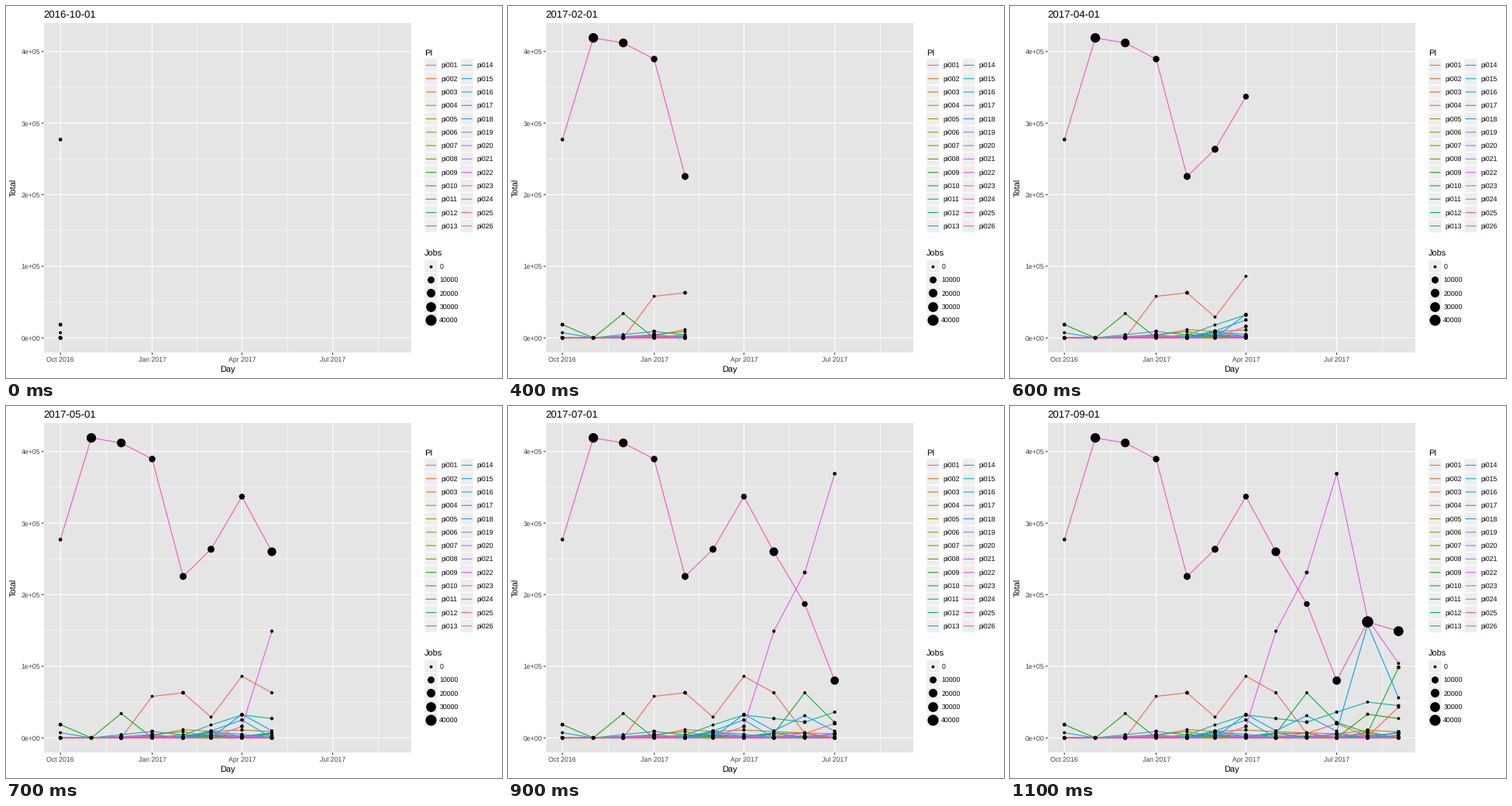
These frames come from a looping animation (640 by 480 pixels, 1.2 s). A matplotlib script:

```python
import matplotlib.pyplot as plt
import numpy as np
from matplotlib.animation import FuncAnimation
from matplotlib.patches import Rectangle

PX = 0.72  # points per pixel at 100 dpi
LINE = 1.07 * PX
PANEL = (48.7, 21.7, 522.9, 447.3)
KEY = 17.28
MAX_JOBS = 43

plt.rcParams["font.family"] = "Liberation Sans"
plt.rcParams["text.hinting"] = "none"

days = np.arange("2016-10", "2017-10", dtype="datetime64[M]").astype("datetime64[D]")
offsets = (days - days[0]).astype(int)
MONTHS, GROUPS = len(days), 26
month = np.arange(MONTHS)


def x_pos(day):
    return 70.2 + 1.287 * day


def y_pos(thousands):
    return 428.2 - 0.9237 * thousands


def hcl(hue, chroma=100, lum=65):
    """Polar LUV colour as RGB, slightly darkened by a display gamma."""
    h = np.radians(hue)
    y = ((lum + 16) / 116) ** 3
    u = chroma * np.cos(h) / (13 * lum) + 0.1978
    v = chroma * np.sin(h) / (13 * lum) + 0.4683
    x = 9 * y * u / (4 * v)
    z = -x / 3 - 5 * y + 3 * y / v
    rgb = np.array([
        3.240479 * x - 1.537150 * y - 0.498535 * z,
        -0.969256 * x + 1.875992 * y + 0.041556 * z,
        0.055648 * x - 0.204043 * y + 1.057311 * z,
    ]).clip(0, 1)
    srgb = np.where(rgb > 0.00304, 1.055 * rgb ** (1 / 2.4) - 0.055, 12.92 * rgb)
    return tuple(srgb.clip(0, 1) ** 1.25)


def area(jobs):
    size = 1 + 5 * np.sqrt(np.asarray(jobs) / MAX_JOBS)
    diameter = 0.75 * (size * 2.845 + 0.945) + 1
    return (diameter * PX) ** 2


def bursts(decay, peaks):
    """Jump to each peak, then fall by a constant factor per month."""
    level, out = 0, []
    for m in month:
        level = peaks.get(m, level * decay)
        out.append(level)
    return np.array(out)


# Totals and jobs in thousands: low seeded noise under a few busy groups
rng = np.random.default_rng(5)
totals = 9 * rng.random((GROUPS, MONTHS)) ** 5 * np.clip((month - 1) / 3, 0, 1)
totals[-2:] = 0
jobs = 0.6 * rng.random((GROUPS, MONTHS)) ** 4

busy = {
    1: bursts(0.1, {3: 58, 4: 63, 5: 29, 6: 86, 7: 63, 9: 20, 11: 43}),
    3: bursts(0.8, {4: 11.4, 6: 11, 10: 10.5}),
    9: bursts(0, {0: 18.5, 2: 34, 10: 33, 11: 27}),
    10: bursts(0.34, {8: 63, 11: 98.5}),
    13: 4.5 * (month - 1).clip(0) + 9.5 * np.cos(np.pi / 2 * (month - 6)) * (month > 3),
    16: bursts(0, {0: 7.2, 5: 9.7, 6: 25, 11: 8}),
    17: bursts(0.3, {6: 33, 8: 31, 10: 158, 11: 56}),
    22: bursts(0.45, {6: 16, 7: 149, 8: 231, 9: 369, 11: 104}),
}
for group, values in busy.items():
    totals[group - 1] = np.maximum(totals[group - 1], values)

LEADER = 23
totals[LEADER] = [277, 419, 412, 389.5, 225.5, 263.5, 337, 260, 187, 80, 162, 149]
jobs[LEADER] = [0.3, 27, 21, 8, 10, 10, 5, 21, 5, 18, MAX_JOBS, 30]

xs, ys = x_pos(offsets), y_pos(totals)
colors = [hcl(15 + 360 * i / GROUPS) for i in range(GROUPS)]

fig = plt.figure(figsize=(6.4, 4.8), dpi=100, facecolor="white")
ax = fig.add_axes([0, 0, 1, 1])
ax.set(xlim=(0, 640), ylim=(480, 0))
ax.axis("off")


def rect(x0, y0, x1, y1, color, **kw):
    ax.add_patch(Rectangle((x0, y0), x1 - x0, y1 - y0, fc=color, **kw))


def segment(x0, y0, x1, y1, color, width=LINE):
    ax.plot([x0, x1], [y0, y1], color=color, lw=width, snap=False,
            solid_capstyle="butt")


def label(x, y, text, size=8.8, color="black", **kw):
    return ax.text(x, y, text, fontsize=size * PX, color=color, **kw)


def legend_key(x, y):
    rect(x, y, x + KEY, y + KEY, "#eeeeee", ec="white", lw=LINE, snap=False)


# Panel, grid and axes
left, top, right, bottom = PANEL
rect(*PANEL, "#e5e5e5", lw=0)
for total in range(50, 400, 100):
    segment(left, y_pos(total), right, y_pos(total), "white", LINE / 2)
for day in 46 + 91 * np.arange(4):
    segment(x_pos(day), top, x_pos(day), bottom, "white", LINE / 2)
for i in range(5):
    y = y_pos(100 * i)
    segment(left, y, right, y, "white")
    segment(left - 2.74, y, left, y, "#333333")
    label(44, y + 3.4, f"{i}e+0{5 if i else 0}", color="#454545", ha="right")
for i, name in zip(range(0, 12, 3), ("Oct 2016", "Jan 2017", "Apr 2017", "Jul 2017")):
    segment(xs[i], top, xs[i], bottom, "white")
    segment(xs[i], bottom, xs[i], bottom + 2.74, "#333333")
    label(xs[i], 459.2, name, color="#454545", ha="center")
label(285.8, 472.2, "Day", 11, ha="center")
label(13.6, 234.5, "Total", 11, ha="center", rotation=90, rotation_mode="anchor")
title = label(48.5, 15.2, "", 13.2)

# Legends
label(539.8, 63.8, "PI", 11)
for i, color in enumerate(colors):
    col, row = divmod(i, 13)
    x, y = 539.8 + 46.1 * col, 67.8 + KEY * row
    legend_key(x, y)
    segment(x + 0.1 * KEY, y + KEY / 2, x + 0.9 * KEY, y + KEY / 2, color)
    label(x + 21.3, y + 11.8, f"pi{i + 1:03d}")
label(539.8, 322.8, "Jobs", 11)
for i in range(5):
    y = 327.1 + KEY * i
    legend_key(539.8, y)
    ax.scatter(548.4, y + KEY / 2, s=area(10 * i), c="black", lw=0, zorder=3)
    label(559.2, y + 11.8, str(10000 * i))

lines = [ax.plot([], [], color=c, lw=LINE, zorder=4, solid_capstyle="butt")[0]
         for c in colors]
points = ax.scatter([], [], c="black", lw=0, zorder=5)


def update(k):
    n = k + 1
    for line, y in zip(lines, ys):
        line.set_data(xs[:n], y[:n])
    points.set_offsets(np.column_stack([np.tile(xs[:n], GROUPS), ys[:, :n].ravel()]))
    points.set_sizes(area(jobs[:, :n]).ravel())
    title.set_text(str(days[k]))
    return [*lines, points, title]


anim = FuncAnimation(fig, update, frames=MONTHS, interval=100, repeat=True,
                     repeat_delay=0, blit=False)
plt.show()
```
